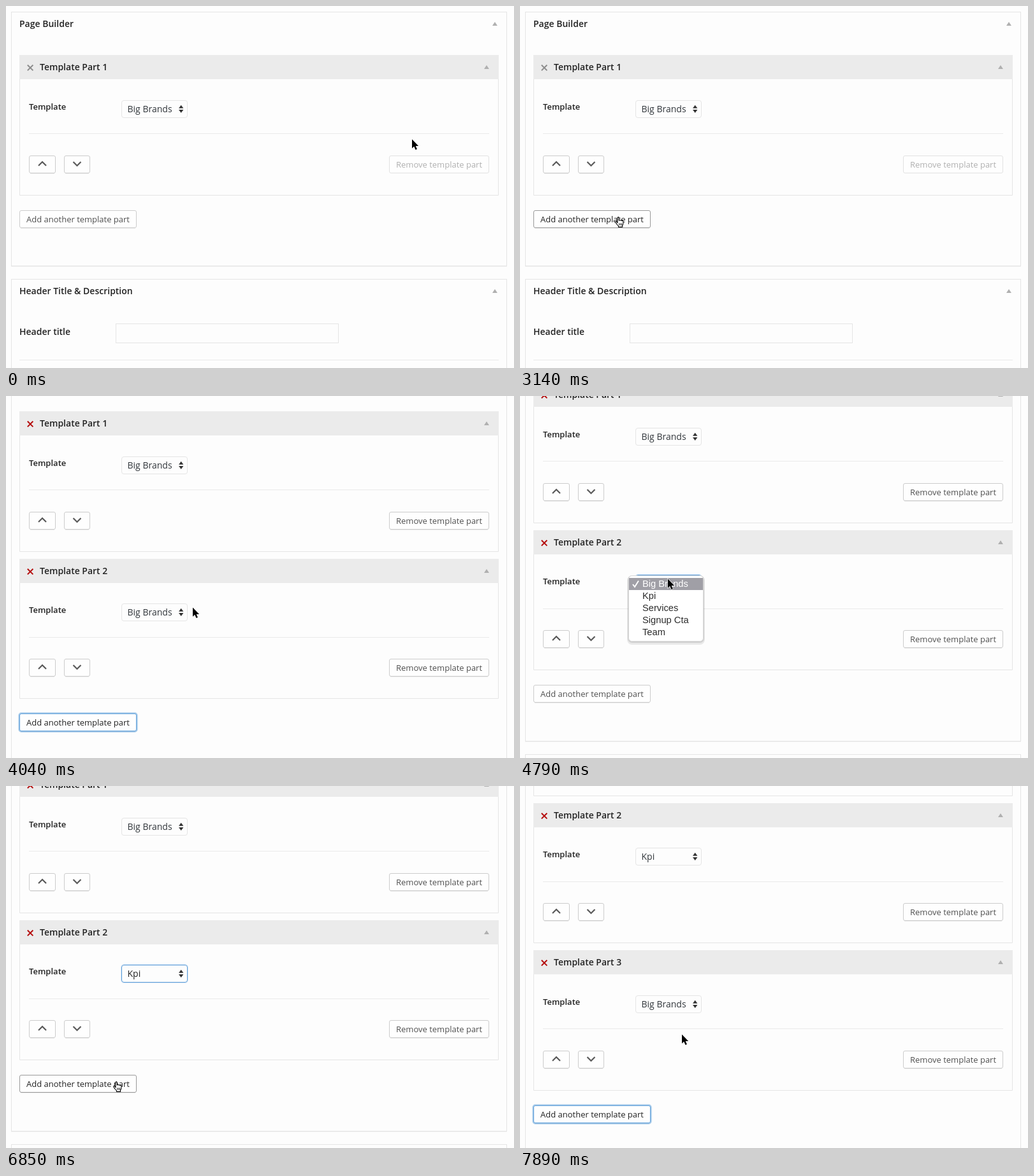
Animation, 797 px wide and 569 px high, one loop 8 s. Source, as an HTML page:

```html
<!DOCTYPE html>
<html lang="en">
<head>
<meta charset="utf-8">
<title>Page Builder</title>
<style>
html, body { margin: 0; width: 100%; height: 100%; overflow: hidden; background: #fdfdfd; }
svg { display: block; position: absolute; left: 0; top: 0; }
text { font: 13px "Open Sans", sans-serif; fill: #505050; white-space: pre; }
.title { font-size: 14px; font-weight: 600; fill: #222; }
.label { font-weight: 600; fill: #222; }
.value { font-size: 14px; fill: #32373c; }
.frame { fill: none; stroke: #e5e5e5; }
.rule { stroke: #eaeaea; }
.btn { fill: #fefefe; stroke: #ccc; }
.shade { fill: none; stroke: #000; stroke-opacity: .07; }
.chev { fill: none; stroke: #5a5a5a; stroke-width: 2.2; }
.x { stroke: #b50d0d; stroke-width: 2; }
.tri { fill: #b0b0b0; }
.glow { fill: none; stroke: #5b9dd9; stroke-width: 2.4; stroke-opacity: .5; visibility: hidden; }
.select .glow { stroke-width: 1; stroke-opacity: .25; }
.single .x { stroke: #8c8c8c; }
.single .remove .btn { stroke: #e2e2e2; }
.single .remove .shade { stroke: none; }
.single .remove text { fill: #b0b0b0; }
.hover .btn { stroke: #999; }
.hover text, .focus text { fill: #222; }
.focus .btn, .focus .pick { stroke: #5b9dd9; }
.focus .glow { visibility: visible; }
#menu text { font: 14.7px "Liberation Sans", Arial, sans-serif; fill: #2c2c2c; }
#menu .bar { fill: none; }
#menu .on .bar { fill: #a09fa6; }
#menu .on text { fill: #fff; }
#menu path { fill: none; stroke: #2c2c2c; stroke-width: 1.9; }
#menu .on path { stroke: #fff; }
</style>
</head>
<body>
<svg id="stage" width="797" height="569" viewBox="0 0 797 569"></svg>
<script>
const LOOP = 8000;
const TICK = 148.8;
const PITCH = 231.5; // height of one template part with its gap
const OPTIONS = ['Big Brands', 'Kpi', 'Services', 'Signup Cta', 'Team'];

// Moments of the story, counted in ticks
const HOVER = 18, ADD = 23, SCROLL = 24, OPEN = 32, PICK = 34, CLOSE = 38, HOVER_AGAIN = 45, ADD_AGAIN = 48;

// Pointer stops: [tick, x, y]
const PATH = [
  [0, 636, 209], [2, 646, 238], [7, 484, 162], [10, 556, 214], [13, 390, 160], [15, 247, 183],
  [16, 179, 291], [HOVER, 150, 331], [SCROLL, 147, 331], [27, 292, 332], [31, 231, 287],
  [OPEN, 231, 287], [35, 225, 319], [CLOSE, 225, 319], [41, 420, 375], [HOVER_AGAIN, 172, 466],
  [46, 168, 464], [ADD_AGAIN, 168, 464], [50, 282, 458], [53, 253, 390]
];

const text = (x, y, cls, s) => `<text x="${x}" y="${y}" class="${cls}">${s}</text>`;
const box = (x, y, w, h, cls, r = 0) =>
  `<rect x="${x + .5}" y="${y + .5}" width="${w - 1}" height="${h - 1}" rx="${r}" class="${cls}"/>`;
const group = (y, inner, cls = '') => `<g class="${cls}" transform="translate(0 ${y})">${inner}</g>`;
const rule = (x, y, w) => `<path class="rule" d="M${x} ${y + .5}h${w}"/>`;
const toggle = (x, y) => `<path class="tri" d="M${x - 4} ${y + 3}h8l-4 -6z"/>`;

const button = (x, y, w, inner) =>
  `<path class="shade" d="M${x + 2} ${y + 28.5}h${w - 4}"/>` +
  box(x - 1, y - 1, w + 2, 30, 'glow', 3.5) + box(x, y, w, 28, 'btn', 2.5) + inner;

const select = `<g class="select">` +
  box(180, 147, 106, 30, 'glow', 4.5) + box(181, 148, 104, 28, 'frame pick', 3.5) +
  text(190.5, 167, 'value', OPTIONS[0]) +
  `<path fill="#333" d="M271 160.8h7.4l-3.7 -5zM271 163h7.4l-3.7 5z"/></g>`;

// Half-pixel rows: borders and titles round up, controls round down.
const up = (i) => Math.ceil(i * PITCH);
const down = (i) => Math.floor(i * PITCH);

const part = (i) => `<g class="part">` +
  group(up(i),
    `<path class="frame" d="M21.5 115V${297.5 + down(i) - up(i)}H772.5V115"/>` +
    `<rect x="21" y="77" width="752" height="38" fill="#ebebeb"/>` +
    `<path class="x" d="M33.8 92.8l8.6 8.6m0 -8.6l-8.6 8.6"/>` +
    text(53, 101, 'title', `Template Part ${i + 1}`) + toggle(754, 96) + rule(36, 200, 722)) +
  group(down(i),
    text(36, 162.5, 'label', 'Template') + select +
    button(36, 235, 42, `<path class="chev" d="M51 251l6 -6l6 6"/>`) +
    button(91, 235, 41, `<path class="chev" d="M105.5 245l6 6l6 -6"/>`) +
    `<g class="remove">` + button(601, 235, 157, text(612, 254, '', 'Remove template part')) + `</g>`) +
  `</g>`;

const option = (s, i) => group(i * 19,
  `<rect class="bar" x="171" y="286" width="116" height="19"/>` +
  (i ? '' : `<path d="M177 296l3 4l6 -9.5"/>`) + text(192, 300, '', s), 'row');

const menu = `<g id="menu">
  <rect x="168" y="282" width="122" height="109" rx="8" opacity=".08"/>
  <rect x="169" y="282" width="120" height="106" rx="7" opacity=".1"/>
  <rect x="170.5" y="282.5" width="117" height="103" rx="5" fill="#fff" stroke="#d6d6d6"/>
  ${OPTIONS.map(option).join('')}</g>`;

const cursors = `<path id="arrow" d="M1 .5V14.7L4.2 11.7L6.5 16.9L8.9 15.9L6.7 10.9H11.1Z"
    stroke="#fff" stroke-width="1.2" paint-order="stroke"/>
  <g id="hand" stroke="#000" stroke-width="1.1" stroke-linejoin="round">
    <path fill="#fff" d="M4 10V1.8Q5 0 6.3 1.8V6Q7.3 5 8.5 6Q9.7 5.3 10.7 6.6Q12.4 6 12.9 7.6V11Q12.6 13 11.5 14V16.4H5.5L5.3 14.6Q2.5 12 .8 9Q.5 7 2.2 7.5Z"/>
    <path stroke-width=".9" d="M6.7 10.5v3.2M8.7 10.5v3.2M10.6 10.5v3.2"/></g>`;

const stage = document.getElementById('stage');
stage.innerHTML = `<g id="page">` +
  `<path id="shadow" fill="none" stroke="#000" stroke-opacity=".05"/>` +
  `<rect id="panel" class="frame" x="8.5" y="9.5" width="777"/>` +
  text(21, 33, 'title', 'Page Builder') + toggle(767, 28) +
  [0, 1, 2].map(part).join('') +
  `<g id="add">` + button(21, 321, 184, text(32, 340, '', 'Add another template part')) + `</g>` +
  `<g id="next">` + box(8, 429, 778, 400, 'frame') +
  text(21, 453, 'title', 'Header Title &amp; Description') + toggle(767, 448) +
  text(21, 517, 'title', 'Header title') + box(172, 499, 350, 31, 'frame') +
  rule(21, 556, 752) + `</g></g>` + menu + cursors;

const $ = (id) => document.getElementById(id);
const all = (sel) => [...document.querySelectorAll(sel)];
const parts = all('.part'), rows = all('.row');
const second = all('.select')[1];

const move = (el, x, y) => el.setAttribute('transform', `translate(${Math.round(x)} ${Math.round(y)})`);
const show = (el, on) => { el.style.display = on ? '' : 'none'; };
const within = (n, a, b) => n >= a && n < b;
const progress = (n, from, length) => Math.max(0, (n - from) / length);

function pointerAt(n) {
  const i = PATH.findIndex((p) => p[0] > n);
  if (i < 0) return PATH[PATH.length - 1].slice(1);
  const [t0, x0, y0] = PATH[i - 1], [t1, x1, y1] = PATH[i];
  const u = (n - t0) / (t1 - t0);
  return [x0 + (x1 - x0) * u, y0 + (y1 - y0) * u];
}

// A swipe that eases in and out, then one that is still speeding up.
function scrollAt(n) {
  const u = Math.min(1, progress(n, SCROLL, 5.7));
  return 98 * u * u * (3 - 2 * u) + 184 * progress(n, ADD_AGAIN, 5) ** 2.05;
}

function draw(time) {
  const n = Math.floor(time / TICK);
  const extra = (n >= ADD) + (n >= ADD_AGAIN);
  const hover = within(n, HOVER, ADD) || within(n, HOVER_AGAIN, ADD_AGAIN);

  move($('page'), 0, -scrollAt(n));
  stage.classList.toggle('single', !extra);
  parts.forEach((p, i) => show(p, i <= extra));
  $('panel').setAttribute('height', 399 + up(extra));
  $('shadow').setAttribute('d', `M8 ${409.5 + up(extra)}H786`);
  move($('add'), 0, down(extra));
  move($('next'), 0, up(extra));
  $('add').classList.toggle('hover', hover);
  $('add').classList.toggle('focus', within(n, ADD, OPEN) || n >= ADD_AGAIN);

  second.classList.toggle('focus', within(n, OPEN, ADD_AGAIN));
  second.querySelector('text').textContent = OPTIONS[+(n >= CLOSE)];
  show($('menu'), within(n, OPEN, CLOSE));
  rows.forEach((r, i) => r.classList.toggle('on', i === +(n >= PICK)));

  show($('hand'), hover);
  show($('arrow'), !hover);
  move($(hover ? 'hand' : 'arrow'), ...pointerAt(n));
}

const begin = performance.now();
function frame() {
  draw((performance.now() - begin) % LOOP);
  requestAnimationFrame(frame);
}
draw(0);
requestAnimationFrame(frame);
</script>
</body>
</html>
```
